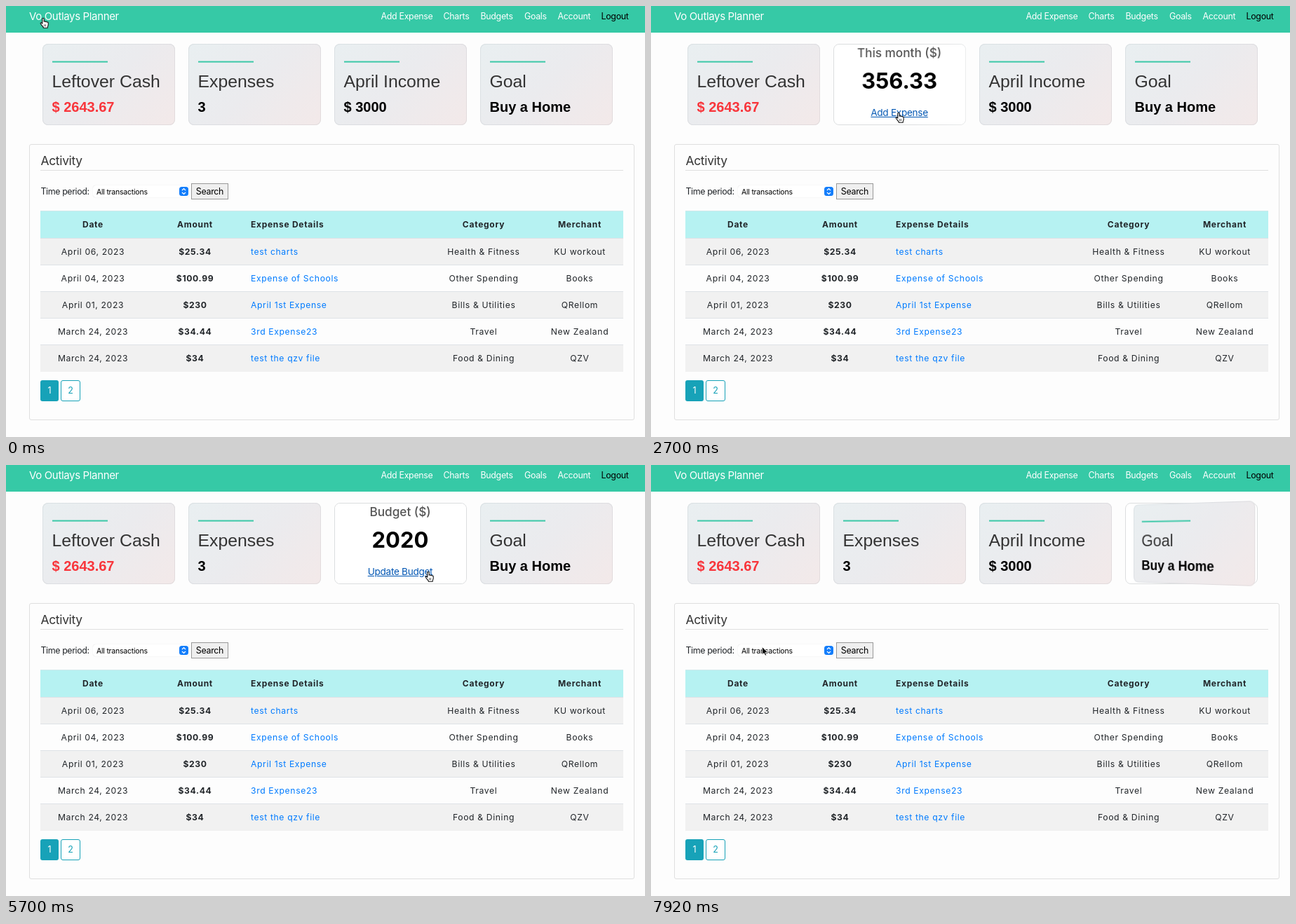
Recreate the animation shown at these times as an HTML page. Size 911 by 615 pixels, loop 8 s.

```html
<!DOCTYPE html>
<html lang="en">
<head>
<meta charset="utf-8">
<title>Expense dashboard</title>
<style>
html, body { margin: 0; width: 100%; height: 100%; overflow: hidden; background: #fdfdfd; }
#stage { position: relative; width: 911px; height: 615px; overflow: hidden; color: #212529;
  font-family: Inter, "Open Sans", sans-serif; }
#stage div, #stage span, #stage svg { position: absolute; box-sizing: border-box; }
span { height: 40px; line-height: 40px; white-space: pre; }
.mid { width: 300px; text-align: center; }
.brand { font-size: 15px; letter-spacing: -.35px; color: #fff; }
.nav { font-size: 12.4px; letter-spacing: -.3px; color: #fff; }
.title { font-size: 17.4px; letter-spacing: -.3px; color: #333; }
.label { font-size: 12.4px; letter-spacing: -.38px; }
.option { font-size: 10.5px; letter-spacing: -.22px; color: #000; }
.cell { font-size: 12.2px; letter-spacing: .62px; }
.strong { font-weight: 700; }
.head { font-weight: 700; font-size: 12px; letter-spacing: .72px; }
.link { color: #007bff; }
.page { font-size: 12.5px; }
.card { width: 189px; height: 116px; top: 54px; perspective: 800px; }
.frame { inset: 0; border: 1px solid #dcdedf; border-radius: 8px; background: #fff; }
.face { backface-visibility: hidden; border-radius: 8px; }
.front { inset: 0; background: linear-gradient(135deg, #e9eff1, #ebebee 50%, #f3e9e9);
  box-shadow: inset 0 0 0 1px rgba(90, 100, 110, .1); }
.back { inset: 1px; background: #fff; }
.big, .sum { font-family: "Liberation Sans", Arial, sans-serif; }
.big { font-size: 24.8px; color: #333; }
.sum { font-size: 20px; font-weight: 700; color: #000; }
.note { font-size: 17.2px; font-weight: 500; color: #555; }
.num { font-size: 31px; font-weight: 700; color: #000; }
.action { font-size: 13.6px; letter-spacing: -.3px; color: #007bff; }
.action.hover { color: #0056b3; text-decoration: underline; }
</style>
</head>
<body>
<div id="stage"></div>
<script>
const stage = document.getElementById('stage');

function add(parent, tag, cls, css) {
  const el = document.createElement(tag);
  el.className = cls;
  el.style.cssText = css;
  return parent.appendChild(el);
}

function box(x, y, w, h, css, parent = stage) {
  return add(parent, 'div', '', `left:${x}px;top:${y}px;width:${w}px;height:${h}px;${css}`);
}

// y is the middle of the capitals
function text(str, x, y, cls, css = '', parent = stage) {
  const el = add(parent, 'span', cls, `left:${x}px;top:${y - 20}px;${css}`);
  el.textContent = str;
  return el;
}

const center = (str, x, y, cls, css, parent) =>
  text(str, x - 150, y, cls + ' mid', css, parent);

function svg(w, h, body) {
  const el = add(stage, 'div', '', `left:0;top:0;width:${w}px;height:${h}px`);
  el.innerHTML = `<svg width="${w}" height="${h}" style="overflow:visible">${body}</svg>`;
  return el;
}

function buildNav() {
  box(0, 0, 911, 38, 'background:#36c9a6');
  text('Vo Outlays Planner', 33, 15, 'brand');
  const items = [['Add Expense', 534.5], ['Charts', 623.5], ['Budgets', 676.5],
    ['Goals', 739], ['Account', 786.5], ['Logout', 848.5]];
  for (const [name, x] of items) text(name, x, 15, 'nav', name === 'Logout' ? 'color:#000' : '');
}

function buildPanel() {
  box(33, 197, 863, 394, 'border:1px solid #dfdfdf;border-radius:3px');
  text('Activity', 49.5, 220.5, 'title');
  box(49, 234, 831, 1, 'background:#dfdfdf');

  text('Time period:', 49.5, 265, 'label');
  box(124, 256, 137, 17, 'background:#fff;border-radius:4px;box-shadow:0 0 1px #ccc');
  text('All transactions', 129, 265.5, 'option');
  const knob = svg(13, 13, `<rect width="13" height="13" rx="3.5" fill="#147efb"/>
    <path d="M4 5L6.5 2.6L9 5M4 8L6.5 10.4L9 8" fill="none" stroke="#fff" stroke-width="1.3"/>`);
  knob.style.transform = 'translate(247px,258px)';
  box(264, 253, 53, 23, 'background:#efefef;border:1px solid #999');
  center('Search', 290.5, 265, 'label', 'letter-spacing:-.3px;color:#000');

  box(49, 292, 831, 39, 'background:#b6f2f2;border-top:1px solid #cfe8ea');
  center('Date', 124, 312, 'head');
  center('Amount', 269.5, 312, 'head');
  text('Expense Details', 349, 312, 'head');
  center('Category', 681, 312, 'head');
  center('Merchant', 818, 312, 'head');

  const rows = [
    ['April 06, 2023', '$25.34', 'test charts', 'Health & Fitness', 'KU workout'],
    ['April 04, 2023', '$100.99', 'Expense of Schools', 'Other Spending', 'Books'],
    ['April 01, 2023', '$230', 'April 1st Expense', 'Bills & Utilities', 'QRellom'],
    ['March 24, 2023', '$34.44', '3rd Expense23', 'Travel', 'New Zealand'],
    ['March 24, 2023', '$34', 'test the qzv file', 'Food & Dining', 'QZV']
  ];
  rows.forEach(([date, amount, detail, category, merchant], i) => {
    const top = 331 + 38 * i, y = top + 20;
    box(49, top, 831, 38,
      `border-top:1px solid #dee2e6;background:${i % 2 ? '#fdfdfd' : '#f1f1f1'}`);
    center(date, 124, y, 'cell');
    center(amount, 269.5, y, 'cell strong');
    text(detail, 349, y, 'cell link');
    center(category, 681, y, 'cell');
    center(merchant, 818, y, 'cell');
  });
  box(49, 521, 831, 1, 'background:#f1f1f1');

  box(49, 534, 26, 30, 'background:#17a2b8;border-radius:3px');
  center('1', 62, 549, 'page', 'color:#fff');
  box(78, 534, 28, 30, 'background:#fff;border:1px solid #17a2b8;border-radius:3px');
  center('2', 92, 549, 'page', 'color:#17a2b8');
}

// flips: [start time, target side]; link: half width of the action
const cardData = [
  { title: 'Leftover Cash', sum: '$ 2643.67', color: '#f8363c', flips: [] },
  { title: 'Expenses', sum: '3', back: ['This month ($)', '356.33', 'Add Expense'],
    link: 41, flips: [[2124, 1], [4280, 0]] },
  { title: 'April Income', sum: '$ 3000', back: ['Budget ($)', '2020', 'Update Budget'],
    link: 46, flips: [[4409, 1], [6175, 0]] },
  { title: 'Goal', sum: 'Buy a Home', back: ['Saving ($)', '10640', 'Update Goal'],
    link: 39, flips: [[6193, 1], [7528, 0]] }
];

function buildCard(data, i) {
  const x = 52 + 208 * i;
  const card = add(stage, 'div', 'card', `left:${x}px`);
  add(card, 'div', 'frame', '');
  const front = add(card, 'div', 'face front', '');
  box(14, 25, 79, 2, 'background:#3cc8a8;transform:translateY(-.4px)', front);
  text(data.title, 13.5, 54, 'big', '', front);
  text(data.sum, 13.5, 90, 'sum', data.color ? `color:${data.color}` : '', front);
  const result = { ...data, x, front };
  if (data.back) {
    const [note, num, action] = data.back;
    result.rear = add(card, 'div', 'face back', '');
    center(note, 93, 11.5, 'note', '', result.rear);
    center(num, 93, 51.5, 'num', '', result.rear);
    result.action = center(action, 93, 97, 'action', '', result.rear);
  }
  return result;
}

buildNav();
buildPanel();
const cards = cardData.map(buildCard);

const hand = svg(14, 16, `<path d="M3.5 8.5V1.7a1.2 1.2 0 0 1 2.4 0V5.6c.4-.7 2-.6 2.2.3.5-.6 1.9-.4 2 .5
  .7-.4 1.8 0 1.8 1V10c0 1.2-.8 2-1 3.8v.7H5v-.7C4.3 12 2 10.3 1 8.6c-.6-1.1.8-2 1.7-1z"
  fill="#fff" stroke="#111" stroke-width="1.1" stroke-linejoin="round"/>
  <path d="M6.3 9.5v3M8.2 9.5v3" stroke="#111" stroke-width=".7"/>`);
const arrow = svg(10, 14, `<path d="M0 0V11.2L2.6 8.8L4.3 12.6L6.2 11.8L4.5 8.1H8Z"
  fill="#000" stroke="#fff" stroke-width=".8"/>`);

// time and pointer tip
const path = [
  [0, 53, 17], [150, 55, 26], [600, 84, 100], [1050, 112, 153], [1200, 150, 154], [1350, 184, 154],
  [1500, 184, 154], [1650, 189, 154], [1950, 225, 153], [2124, 261, 152], [2250, 321, 151],
  [2400, 345, 152], [2550, 352, 152], [2850, 354, 152], [3299, 354, 152], [3300, 360, 152],
  [3750, 360, 152], [3900, 362, 152.5], [4050, 380, 153], [4280, 449, 151], [4409, 469, 150],
  [4650, 580, 149], [4800, 593, 151], [4950, 599, 152], [5550, 599, 152], [5700, 602, 152],
  [6000, 625, 151], [6193, 677, 151], [6290, 721, 151], [6438, 755, 152], [6586, 770, 154],
  [6734, 776, 155], [7178, 776, 155], [7326, 778, 155], [7478, 765, 165], [7528, 730, 172],
  [7626, 600, 205], [7774, 320, 245], [7918, 158.5, 259.5]
];

function pointerAt(t) {
  const n = path.findIndex(p => p[0] > t);
  if (n < 0) return path[path.length - 1].slice(1);
  const [t0, x0, y0] = path[n - 1], [t1, x1, y1] = path[n];
  const k = (t - t0) / (t1 - t0);
  return [x0 + (x1 - x0) * k, y0 + (y1 - y0) * k];
}

// cubic-bezier(.4, .2, .2, 1)
function ease(x) {
  if (x <= 0) return 0;
  if (x >= 1) return 1;
  const curve = (a, b, u) => 3 * a * u * (1 - u) ** 2 + 3 * b * u * u * (1 - u) + u ** 3;
  let lo = 0, hi = 1;
  for (let i = 0; i < 24; i++) {
    const m = (lo + hi) / 2;
    if (curve(.4, .2, m) < x) lo = m; else hi = m;
  }
  return curve(.2, 1, lo);
}

function flipAt(flips, t) {
  let p = 0;
  for (const [start, side] of flips) p += (side - p) * ease((t - start) / 700);
  return p;
}

const turn = deg => deg ? `rotateY(${deg}deg)` : 'none';

const snap = t => t < 6286 ? Math.floor(t / 150) * 150 : 6290 + Math.floor((t - 6286) / 148) * 148;

function draw(t) {
  const [px, py] = pointerAt(t);
  let pointing = py < 26 && px < 163;
  for (const c of cards) {
    if (px >= c.x && px <= c.x + 189 && py >= 54 && py <= 170) pointing = true;
    if (!c.rear) continue;
    const p = flipAt(c.flips, t);
    c.front.style.transform = turn(-180 * p);
    c.rear.style.transform = turn(180 * (p - 1));
    const over = p > .5 && Math.abs(px - c.x - 94.5) < c.link && py > 143 && py < 162;
    c.action.classList.toggle('hover', over);
  }
  hand.style.visibility = pointing ? 'visible' : 'hidden';
  arrow.style.visibility = pointing ? 'hidden' : 'visible';
  hand.style.transform = `translate(${px - 4.7}px,${py - .3}px)`;
  arrow.style.transform = `translate(${px}px,${py}px)`;
}

const begin = performance.now();
function tick() {
  draw(snap((performance.now() - begin) % 8000));
  requestAnimationFrame(tick);
}
tick();
</script>
</body>
</html>
```
